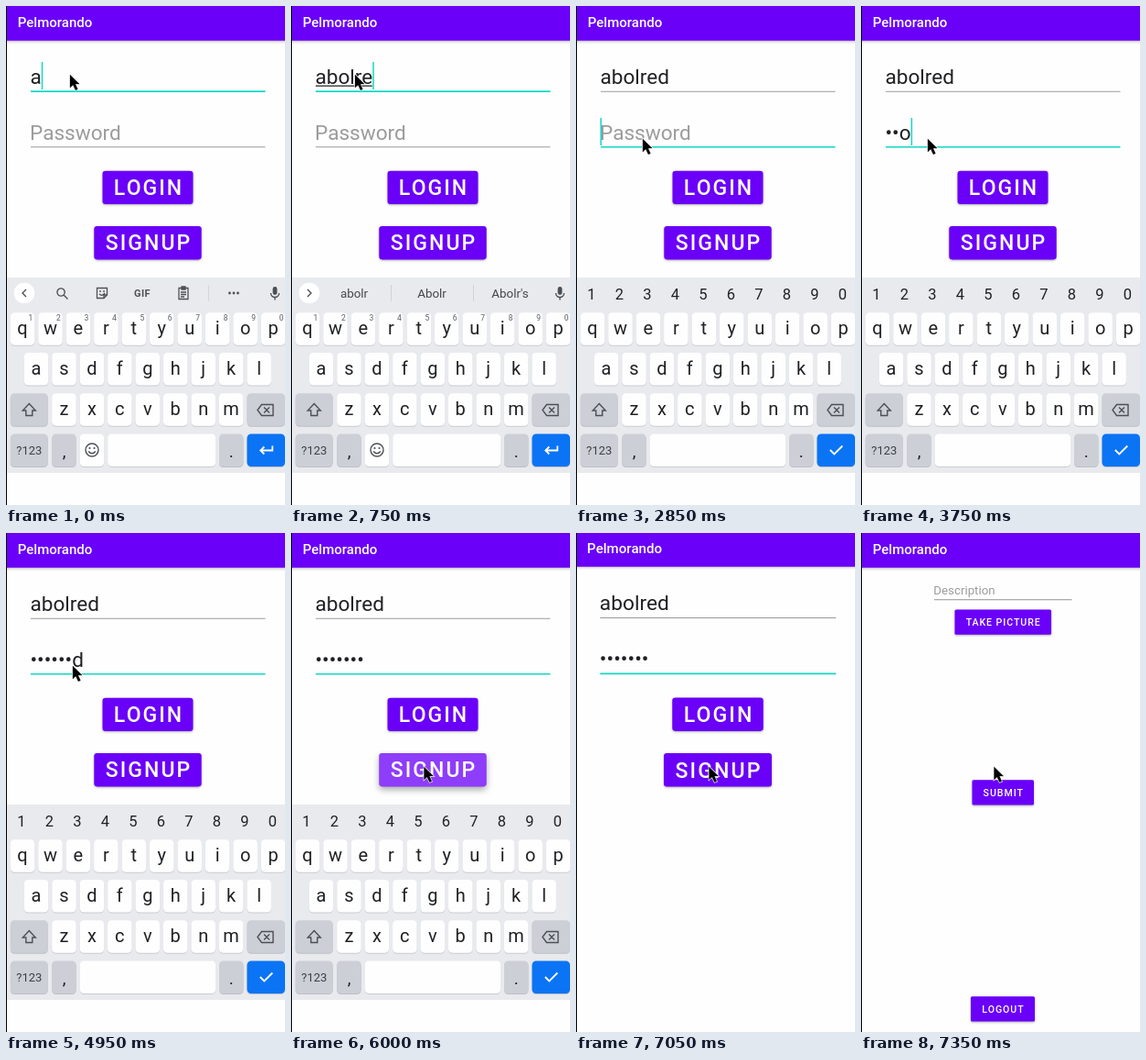
Recreate the animation shown at these times as an HTML page with a canvas. Size 305 px wide and 544 px high, loop 8 s.

```html
<!DOCTYPE html>
<html lang="en">
<head>
<meta charset="utf-8">
<title>Login screen</title>
<style>
html, body { margin: 0; height: 100%; overflow: hidden; background: #fefefe; }
canvas { display: block; width: 100vw; height: 100vh; }
</style>
</head>
<body>
<canvas width="305" height="544"></canvas>
<script>
const ctx = document.querySelector('canvas').getContext('2d');
const W = 305, H = 544, LOOP = 8000, STEP = 150;
const PURPLE = '#6a00f8', TEAL = '#12d8c4', PAGE = '#fefefe', INK = '#202124';
const KEY = '#fefefe', KEY_DARK = '#cccfd6', BOARD = '#e8eaee', ICON = '#4c5055';
const APP = 'Pelmorando', USER = 'abolred', CAPITAL = 'Abolred';

// Step at which each password character is typed
const PASSWORD_STEPS = [22, 23, 25, 27, 28, 28, 29];
// Pointer stops: step, x, y
const POINTER = [
  [0, 70, 75], [9, 72, 92], [10, 76, 118], [11, 79, 130], [14, 76, 138],
  [15, 73, 145], [34, 218, 228], [35, 175, 250], [36, 145.5, 255]
];

function box(x, y, w, h, color, r = 0) {
  ctx.fillStyle = color;
  ctx.beginPath();
  ctx.roundRect(x, y, w, h, r);
  ctx.fill();
}

function text(str, x, y, size, color = INK, align = 'left', weight = 400, spacing = 0) {
  ctx.font = `${weight} ${size}px Roboto, sans-serif`;
  ctx.letterSpacing = spacing + 'px';
  ctx.textAlign = align;
  ctx.fillStyle = color;
  ctx.fillText(str, x, y);
  return ctx.measureText(str).width;
}

function icon(path, x, y, color = ICON, width = 1.4, fill) {
  ctx.save();
  ctx.translate(x, y);
  const shape = new Path2D(path);
  if (fill) { ctx.fillStyle = fill; ctx.fill(shape); }
  ctx.strokeStyle = color;
  ctx.lineWidth = width;
  ctx.stroke(shape);
  ctx.restore();
}

function dot(x, y, r, color = ICON) {
  box(x - r, y - r, 2 * r, 2 * r, color, r);
}

function button(label, x, y, w, h, size, press = 0) {
  ctx.save();
  ctx.shadowColor = 'rgba(0,0,0,.32)';
  ctx.shadowBlur = 2.5 + 5 * press;
  ctx.shadowOffsetY = 1 + 2.5 * press;
  box(x, y, w, h, PURPLE, size / 7);
  ctx.restore();
  if (press) box(x, y, w, h, `rgba(255,255,255,${0.24 * press})`, size / 7);
  const spacing = size * 0.0892;
  text(label, x + w / 2 + spacing / 2, y + h / 2 + size * 0.36, size, '#fff', 'center', 500, spacing);
}

function page() {
  box(0, 0, W, H, PAGE);
  ctx.save();
  ctx.shadowColor = 'rgba(0,0,0,.25)';
  ctx.shadowBlur = 3;
  ctx.shadowOffsetY = 1;
  box(-20, -20, W + 40, 57.8, PURPLE);
  ctx.restore();
  text(APP, 12.8, 23, 15, '#fff', 'left', 500);
}

function field(y, focused) {
  box(27, y - (focused ? 0.4 : 0), 256.5, focused ? 1.7 : 1, focused ? TEAL : '#9a9a9a');
}

function caret(x, y) {
  box(x, y, 1.5, 30, TEAL);
}

function login(n) {
  page();
  const onPassword = n >= 16;

  const name = USER.slice(0, 1 + n);
  const nameWidth = text(name, 26.5, 84.6, 22.6);
  if (n >= 1 && !onPassword) box(27, 86.6, nameWidth - 1, 1.2, INK);
  if (n < 11 || (n >= 14 && n < 16)) caret(26.5 + nameWidth, 61);
  field(92.7, !onPassword);

  const typed = PASSWORD_STEPS.filter(s => n >= s).length;
  let width = 0;
  if (typed) {
    const masked = n >= 40 ? typed : typed - 1;
    width = text('•'.repeat(masked) + USER.slice(masked, typed), 26.5, 145.8, 22.6);
  } else {
    text('Password', 26, 145.8, 22.6, '#9c9c9c');
  }
  if ((n >= 19 && n < 33) || (n >= 36 && n < 40) || (n >= 43 && n < 47)) caret(26.5 + width, 122);
  field(153.3, onPassword);

  const press = n < 36 ? 0 : n < 37 ? 0.5 : n < 41 ? 1 : Math.max(0, (43 - n) / 3);
  button('LOGIN', 105.5, 179.7, 99, 36.3, 23);
  button('SIGNUP', 96.3, 239.9, 117.4, 36.5, 23, press);
}

function home() {
  page();
  text('Description', 79.3, 67, 13.3, '#9c9c9c');
  box(80, 72.3, 150.5, 1, '#929292');
  button('TAKE PICTURE', 102.5, 83.4, 105.5, 27.3, 10.6);
  button('SUBMIT', 121.5, 269.2, 67.5, 27.2, 10.6);
  button('LOGOUT', 120, 505.2, 70, 27.2, 10.6);
}

function key(x, y, w, color = KEY) {
  box(x, y + 1, w, 35.5, color === KEY ? '#c9ccd1' : '#bcbfc6', 4.5);
  box(x, y, w, 35.5, color, 4.5);
}

function letters(row, x, y) {
  [...row].forEach((c, i) => {
    const left = x + i * 30.45;
    key(left, y, 26.5);
    text(c, left + 13.2, y + 24, 20, INK, 'center');
  });
}

function microphone() {
  box(291.6, 306, 4.8, 9, ICON, 2.4);
  icon('M-4.5 0A4.5 4.5 0 0 0 4.5 0M0 4.5V7.5', 294, 313);
}

function toolbar() {
  dot(20, 313, 11.3, '#fff');
  icon('M2-4L-2 0L2 4', 20, 313);
  icon('M3.2-1A4.1 4.1 0 1 1-5-1A4.1 4.1 0 1 1 3.2-1M2 2L6.5 6.5', 61, 313);
  icon('M-5.5-5.5H5.5V2L2 5.5H-5.5ZM5.5 2H2V5.5M-3 1Q0 4 3 0', 105, 313, ICON, 1.3);
  dot(103, 311, 0.9);
  dot(107, 311, 0.9);
  text('GIF', 149, 317, 11, ICON, 'center', 700, 0.4);
  icon('M-5-5.5H5V6.5H-5ZM-2-7H2V-4H-2ZM-3-1H3M-3 1.5H3M-3 4H1', 194, 313, ICON, 1.3);
  box(221, 304, 1, 18, '#d4d6da');
  for (const x of [244.5, 249, 253.5]) dot(x, 313, 1.4);
  microphone();
}

function suggestions(n) {
  dot(20, 313, 11.3, '#fff');
  icon('M-2-4L2 0L-2 4', 20, 313);
  const size = Math.min(n, USER.length);
  const word = CAPITAL.slice(0, size);
  text(USER.slice(0, size), 69, 318, 13.4, '#44474b', 'center');
  text(word, 154, 318, 13.4, '#44474b', 'center');
  text(word + "'s", 239.5, 318, 13.4, '#44474b', 'center');
  box(109, 304, 1, 18, '#d0d2d6');
  box(199, 304, 1, 18, '#d0d2d6');
  microphone();
}

function keyboard(n) {
  const secret = n >= 17;
  box(0, 296, W, 213, BOARD);
  letters('qwertyuiop', 4.8, 334.2);
  letters('asdfghjkl', 19.8, 378);
  letters('zxcvbnm', 50.2, 422.2);

  [...'1234567890'].forEach((d, i) => {
    if (secret) text(d, 17 + i * 30.5, 319.5, 16.5, INK, 'center');
    else text(d, 27 + i * 30.45, 343.2, 8.5, '#5b5e63', 'center');
  });
  if (!secret) n < 1 ? toolbar() : suggestions(n);

  key(4.8, 422.2, 41, KEY_DARK);
  icon('M0-7L7 .5H3.5V6H-3.5V.5H-7Z', 25.3, 440.5);
  key(263.5, 422.2, 41.5, KEY_DARK);
  icon('M-9 0L-4.5-6H8V6H-4.5ZM-2-3L4 3M4-3L-2 3', 284, 440.5);

  key(4.8, 466.5, 41, KEY_DARK);
  text('?123', 25.3, 489, 13, '#3c4043', 'center');
  key(50.2, 466.5, 26.5, KEY_DARK);
  text(',', 63.5, 492, 19, INK, 'center');
  if (secret) {
    key(80.7, 466.5, 148.5);
  } else {
    key(80.7, 466.5, 26.5);
    icon('M7 0A7 7 0 1 1-7 0A7 7 0 1 1 7 0M-3.8 1.5Q0 6 3.8 1.5', 94, 484);
    dot(91.5, 482, 1.1);
    dot(96.5, 482, 1.1);
    key(111.2, 466.5, 118);
  }
  key(233, 466.5, 26.5, KEY_DARK);
  text('.', 246.3, 492, 19, INK, 'center');
  key(263.5, 466.5, 41.5, '#0b74f4');
  icon(n >= 18 ? 'M-6.5 0L-2 4.5L7-4.5' : 'M7-4.5V.5H-6M-2-3.5L-6 .5L-2 4.5', 284.3, 484, '#fff', 1.8);
}

function scaled(k, draw) {
  ctx.save();
  ctx.translate(W / 2, 240);
  ctx.scale(k, k);
  ctx.translate(-W / 2, -240);
  draw();
  ctx.restore();
}

function frame(now) {
  const n = Math.floor((now % LOOP) / STEP);
  box(0, 0, W, H, PAGE);

  if (n < 47) {
    login(n);
    keyboard(n);
  } else if (n < 49) {
    scaled(n < 48 ? 1.005 : 1.06, () => login(n));
    if (n === 48) {
      ctx.globalAlpha = 0.9;
      scaled(0.97, home);
      ctx.globalAlpha = 1;
    }
  } else {
    home();
  }

  box(0, 0, 1, H, '#000');
  const [, x, y] = POINTER.findLast(p => n >= p[0]);
  icon('M0 0V14L3.3 11L6 16.8L8.4 15.8L5.8 10H10.2Z', x, y, '#fff', 1.6);
  icon('M0 0V14L3.3 11L6 16.8L8.4 15.8L5.8 10H10.2Z', x, y, '#000', 0.3, '#000');
  requestAnimationFrame(frame);
}
requestAnimationFrame(frame);
</script>
</body>
</html>
```
